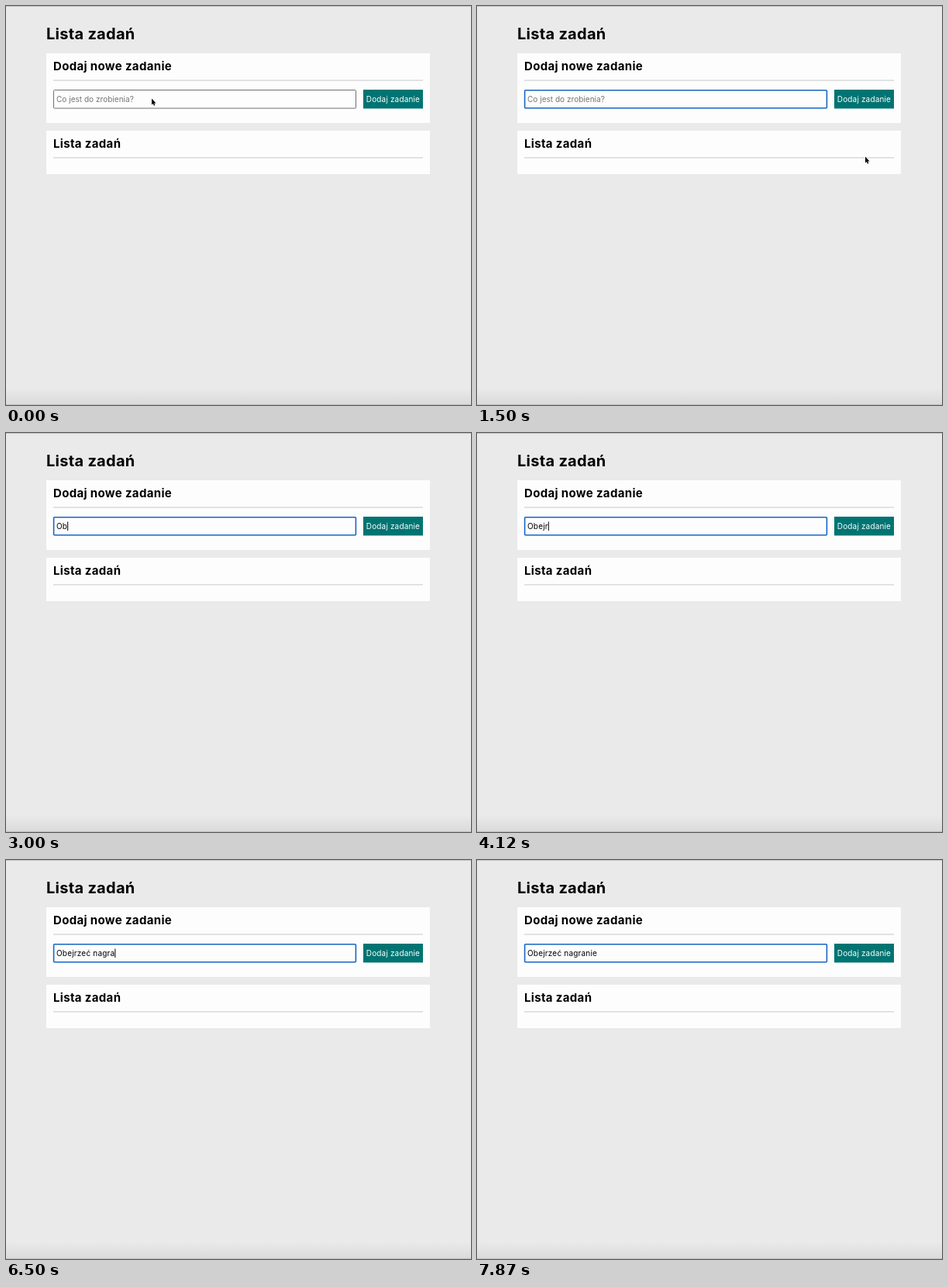
These frames come from a looping animation (600x515 px, 8000 ms). An HTML page:

```html
<!DOCTYPE html>
<html lang="pl">
<head>
<meta charset="utf-8">
<title>Lista zadań</title>
<style>
  html, body { margin: 0; width: 100%; height: 100%; overflow: hidden; background: #eaeaea; }
  svg { display: block; width: 600px; height: 515px; }
  text { font: 10px Inter, "Open Sans", sans-serif; white-space: pre; }
  .title { font-size: 20px; font-weight: 700; letter-spacing: .28px; }
  .heading { font-size: 15px; font-weight: 700; letter-spacing: .34px; }
  .card { fill: #fdfdfd; }
  .rule { fill: #dcdcde; }
  .label { fill: #fff; letter-spacing: .16px; }
  #hint { fill: #757575; letter-spacing: .03px; }
  #entry { letter-spacing: .2px; }
  #field {
    x: 61.5px; y: 108.5px; width: 390px; height: 23.5px;
    fill: #fdfdfd; stroke: #707070; stroke-width: 1px;
  }
  #field.focus {
    x: 61.6px; y: 108.8px; width: 389.8px; height: 23px;
    stroke: #1766c4; stroke-width: 1.6px;
  }
</style>
</head>
<body>
<svg viewBox="0 0 600 515">
  <defs>
    <linearGradient id="fade" x2="0" y2="1">
      <stop stop-color="#eaeaea"/>
      <stop offset="1" stop-color="#dadada"/>
    </linearGradient>
  </defs>
  <rect width="600" height="515" fill="#eaeaea"/>
  <rect y="493" width="600" height="22" fill="url(#fade)"/>
  <rect width="600" height="1" fill="#c2c2c2"/>
  <rect y="514" width="600" height="1" fill="#c2c2c2"/>

  <text class="title" x="52" y="43">Lista zadań</text>

  <rect class="card" x="52" y="61" width="495" height="90"/>
  <text class="heading" x="61" y="83">Dodaj nowe zadanie</text>
  <rect class="rule" x="61" y="95.2" width="477" height="1.6"/>
  <rect id="field" rx="1"/>
  <text id="hint" x="65" y="123.5">Co jest do zrobienia?</text>
  <text id="entry" x="65" y="123.5"></text>
  <rect id="caret" y="114.5" width="1" height="11.5"/>
  <rect x="461" y="108" width="77" height="24.4" fill="#007472"/>
  <text class="label" x="464.8" y="123.5">Dodaj zadanie</text>

  <rect class="card" x="52" y="161" width="495" height="56"/>
  <text class="heading" x="61" y="183">Lista zadań</text>
  <rect class="rule" x="61" y="195" width="477" height="1.6"/>

  <path id="pointer" d="M0 0V8L1.8 6.4 3 9.2 4.3 8.6 3.1 5.9H5.5Z"
        stroke="#fff" stroke-width=".6" paint-order="stroke"/>
</svg>
<script>
  const LOOP = 8000, TICK = 125;
  const FOCUS = 750, TYPE = 2500, SPACE = 5370, DONE = 7120, PAUSE = 500;
  const MESSAGE = "Obejrzeć nagranie";

  const [field, hint, entry, caret, pointer] =
    ["field", "hint", "entry", "caret", "pointer"].map(id => document.getElementById(id));
  const show = (el, on) => el.setAttribute("visibility", on ? "visible" : "hidden");
  const progress = (t, from, to) => Math.min(1, Math.max(0, (t - from) / (to - from)));

  // The second word is typed faster than the first.
  function lettersTyped(t) {
    if (t < TYPE) return 0;
    return Math.floor(1 + 8.3 * progress(t, TYPE, SPACE) + 8 * progress(t, SPACE, DONE));
  }

  function caretOn(t) {
    if (t >= TYPE) return t < 7500;
    return t >= FOCUS && Math.floor((t - FOCUS) / PAUSE) % 2 === 0;
  }

  // Drifts over the field, sweeps down to the list, then flicks out to the right.
  function pointerAt(t) {
    if (t < FOCUS) {
      const p = progress(t, 0, 370);
      return [188 - 1.5 * p, 119.5 - p];
    }
    if (t < TYPE) {
      const p = progress(t, FOCUS, 1500);
      return [513 + 12 * p - 24 * p * p, 122 + 72.5 * p * p * (3 - 2 * p)];
    }
    return t >= 7625 && t < 7875 ? [540 + 29 * progress(t, 7625, 7750), 195] : null;
  }

  function draw() {
    const now = performance.now() % LOOP;
    const t = Math.floor((now + 5) / TICK) * TICK;
    const count = lettersTyped(t), spot = pointerAt(t);

    field.classList.toggle("focus", t >= FOCUS);
    show(hint, count === 0);
    entry.textContent = MESSAGE.slice(0, count);
    caret.setAttribute("x", 65 + entry.getComputedTextLength());
    show(caret, caretOn(t));
    show(pointer, spot);
    if (spot) pointer.setAttribute("transform", `translate(${spot})`);
    requestAnimationFrame(draw);
  }
  draw();
</script>
</body>
</html>
```
